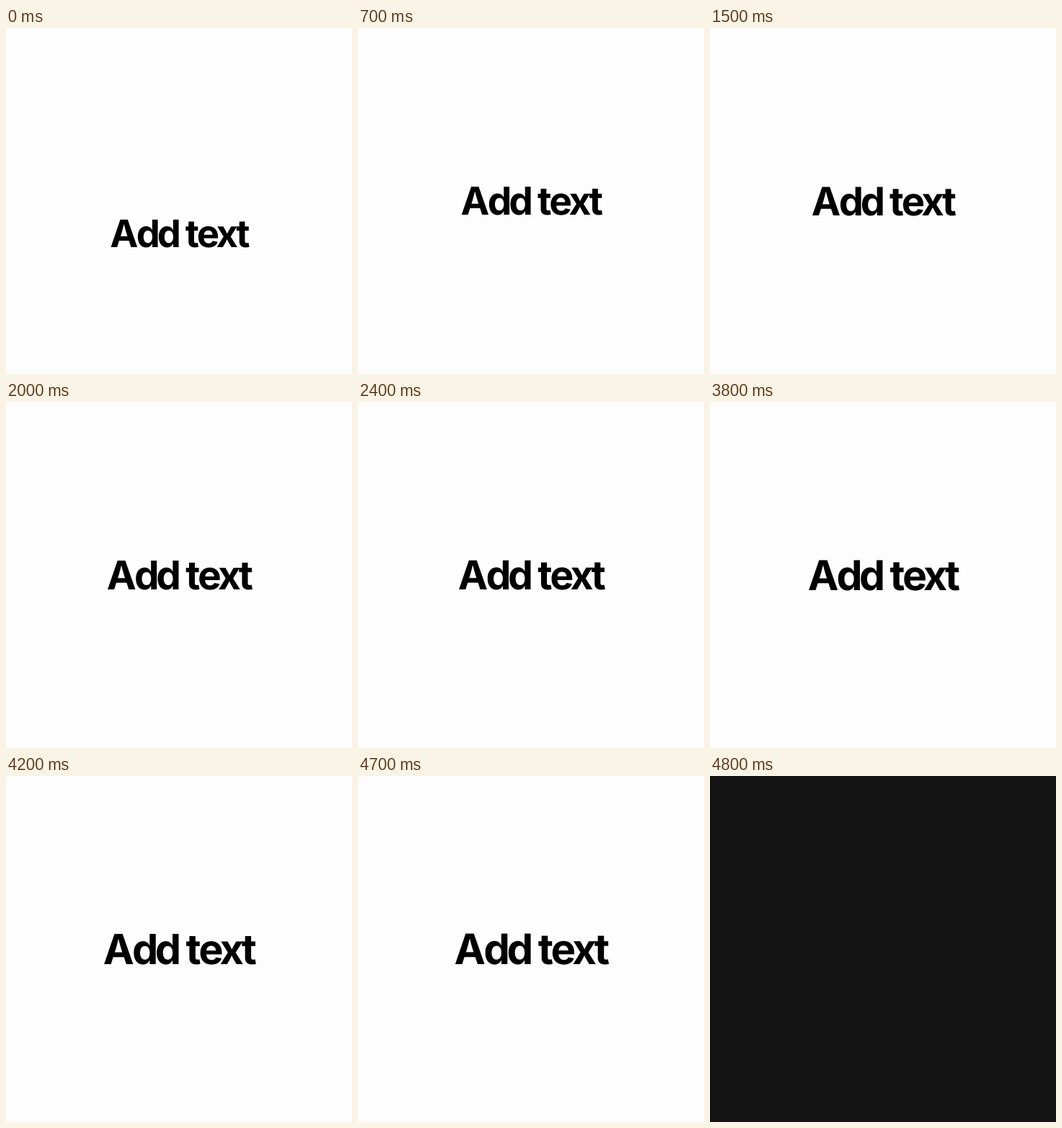
An HTML page for the animation above (5000 ms loop, 480 by 480 pixels).

```html
<!DOCTYPE html>
<html lang="en">
<head>
<meta charset="utf-8">
<title>Add text</title>
<style>
  html, body { margin: 0; width: 100%; height: 100%; overflow: hidden; background: #fdfdfd; }
  svg { display: block; width: 100vw; height: 100vh; }
  text {
    font: 650 52.5px Inter, "Open Sans", sans-serif;
    fill: #000;
    text-rendering: geometricPrecision;
    white-space: pre;
  }
</style>
</head>
<body>
<svg viewBox="0 0 480 480">
  <rect width="480" height="480" fill="#fdfdfd"/>
  <g id="title">
    <text x="-96.8 -60.2 -31.2 -3 7.8 23.8 50.6 78.2" y="19">Add text</text>
  </g>
  <rect id="blackout" width="480" height="480" fill="#141414" visibility="hidden"/>
</svg>
<script>
  const LOOP = 5000, STEP = 100, CUT = 4800;
  const RISE = 600, DROP = 45, GROWTH = 0.0233;
  const title = document.getElementById("title");
  const blackout = document.getElementById("blackout");
  const start = performance.now();

  const easeOut = p => 1 - (1 - p) ** 3;

  function draw(now) {
    const elapsed = Math.max(0, now - start) % LOOP;
    const t = Math.floor(elapsed / STEP) * STEP;
    const y = 240 + DROP * (1 - easeOut(Math.min(1, t / RISE)));
    const scale = 1 + GROWTH * t / 1000;
    title.setAttribute("transform", `translate(241 ${y}) scale(${scale})`);
    blackout.setAttribute("visibility", t >= CUT ? "visible" : "hidden");
    requestAnimationFrame(draw);
  }
  draw(start);
</script>
</body>
</html>
```
